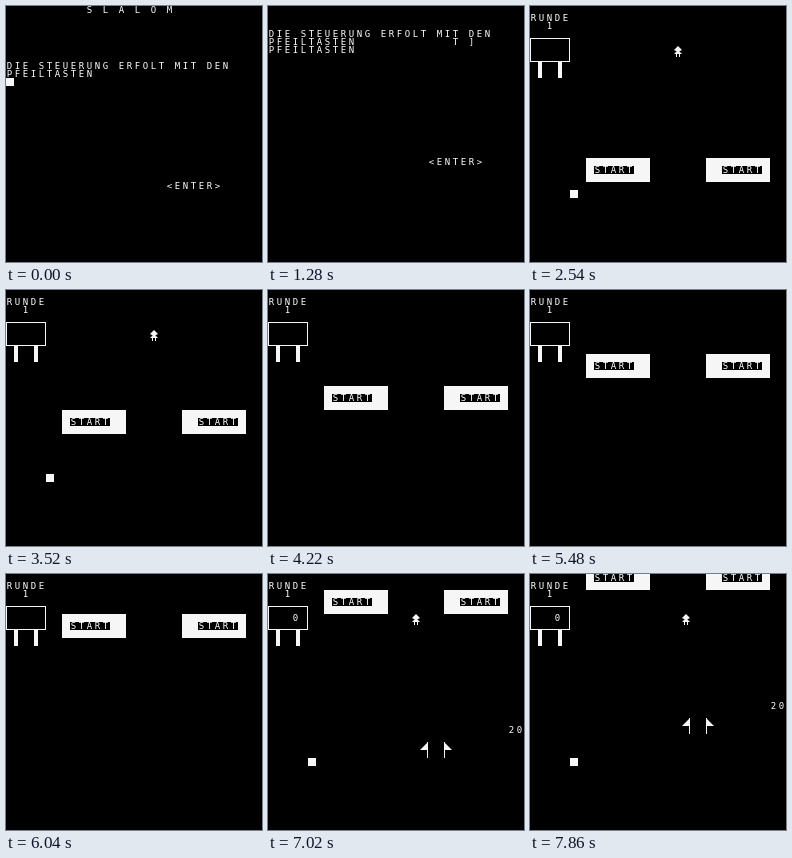
Write an HTML page with a canvas that moves like this. It is 256x256 px and loops after 8000 ms.

```html
<!DOCTYPE html>
<html lang="de">
<head>
<meta charset="utf-8">
<title>Slalom</title>
<style>
html, body { margin: 0; height: 100%; overflow: hidden; background: #000; }
canvas { display: block; }
</style>
</head>
<body>
<canvas id="stage" width="256" height="256"></canvas>
<script>
const ctx = document.getElementById('stage').getContext('2d');
const LOOP = 8000, TICK = 140, INTRO = 1280;
const WHITE = '#f6f6f6';
const FIRST_SCROLL = 2146.2, SCROLL_PERIOD = 258.6;

ctx.font = '9px "DejaVu Sans Mono", monospace';
ctx.textAlign = 'center';

function rect(x, y, w, h, color = WHITE) {
  ctx.fillStyle = color;
  ctx.fillRect(x, y, w, h);
}

function shape(...points) {
  ctx.fillStyle = WHITE;
  ctx.beginPath();
  for (const [x, y] of points) ctx.lineTo(x, y);
  ctx.fill();
}

// One character per 8 x 8 cell.
function print(text, x, y) {
  ctx.fillStyle = '#fff';
  [...text].forEach((c, i) => ctx.fillText(c, x + 8 * i + 3.5, y + 7));
}

function intro(t) {
  if (t < INTRO) {
    print('S L A L O M', 80, 0);
    print('DIE STEUERUNG ERFOLT MIT DEN', 0, 56);
    print('PFEILTASTEN', 0, 64);
    rect(0, 72, 8, 8);
    print('<ENTER>', 160, 176);
  } else if (t < INTRO + TICK) {
    print('DIE STEUERUNG ERFOLT MIT DEN', 0, 24);
    print('PFEILTASTEN', 0, 32);
    print('T ]', 184, 32);
    print('PFEILTASTEN', 0, 40);
    print('<ENTER>', 160, 152);
  } else {
    print('<ENTER>', 160, t < INTRO + 2 * TICK ? 120 : 88);
  }
}

function panel() {
  print('RUNDE', 0, 8);
  print('1', 16, 16);
  rect(0, 32, 40, 24);
  rect(1, 33, 38, 22, '#000');
  rect(8, 56, 4, 16);
  rect(28, 56, 4, 16);
}

function banner(x, textX, y) {
  rect(x, y, 64, 24);
  rect(textX, y + 8, 40, 8, '#000');
  print('START', textX, y + 8);
}

function skier(x, y) {
  shape([x + 4, y], [x + 8, y + 4], [x + 4, y + 6], [x, y + 4]);
  shape([x + 3, y + 5], [x + 5, y + 5], [x + 8, y + 8], [x, y + 8]);
  rect(x + 2, y + 8, 1, 3);
  rect(x + 5, y + 8, 1, 3);
}

function gate(y) {
  shape([160, y], [160, y + 8], [152, y + 8]);
  rect(159, y, 1, 16);
  shape([176, y], [184, y + 8], [176, y + 8]);
  rect(176, y, 1, 16);
  print('20', 240, y - 16);
}

function course(t) {
  const early = Math.floor((t - FIRST_SCROLL) / SCROLL_PERIOD) + 1;
  const late = Math.floor((t - 6950) / 280) + 1;
  const top = 168 - 8 * (Math.min(early, 18) + Math.max(late, 0));
  banner(56, 64, top);
  banner(176, 192, top);
  if (t >= 6810) {
    gate(top + 152);
    print('0', 24, 40);
  }
  // Sprites are erased just before each scroll and redrawn after it.
  const sinceErase = t < 6760 ? (t - FIRST_SCROLL + 40) % SCROLL_PERIOD : Infinity;
  if (sinceErase >= 60) rect(40, 184, 8, 8);
  if (sinceErase >= 80) skier(t < 7230 ? 144 : 152, 40);
}

function draw() {
  const now = performance.now() % LOOP;
  const t = now < INTRO ? 0 : INTRO + TICK * Math.floor((now - INTRO) / TICK);
  rect(0, 0, 256, 256, '#000');
  if (t < 1700) {
    intro(t);
  } else if (t < 1840) {
    print('RUNDE', 0, 8);
    print('1', 16, 16);
  } else {
    panel();
    if (t >= 2120) course(t);
  }
  requestAnimationFrame(draw);
}
draw();
</script>
</body>
</html>
```
